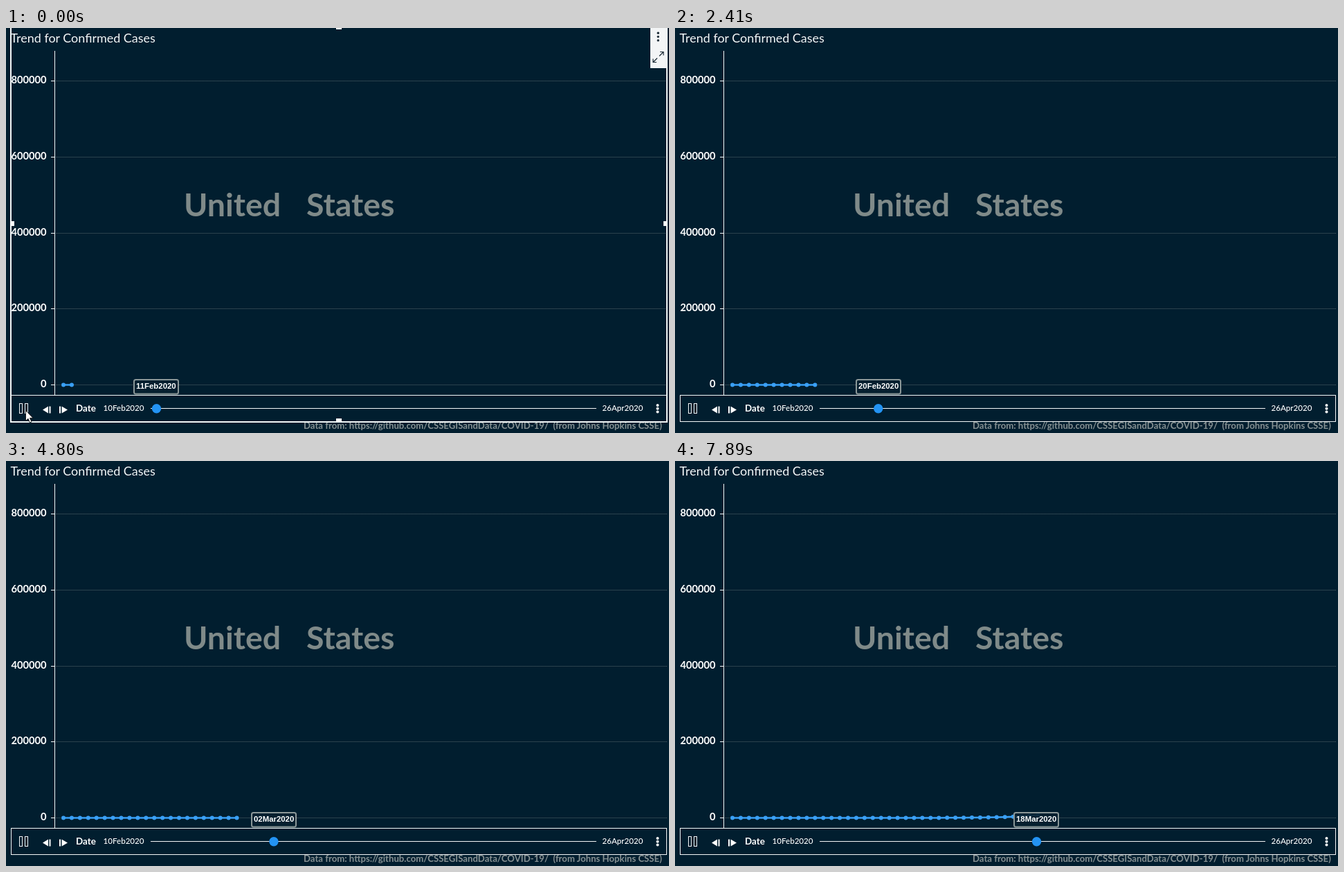
Write an HTML page that moves like this. It is 958 by 585 pixels and loops after 8 s.

```html
<!DOCTYPE html>
<html lang="en">
<head>
<meta charset="utf-8">
<title>Trend for Confirmed Cases</title>
<style>
  html, body { margin: 0; width: 100%; height: 100%; overflow: hidden; background: #011e2f; }
  svg { display: block; width: 958px; height: 585px; font-family: Lato, "Open Sans", sans-serif; fill: #fff; }
  .crisp { shape-rendering: crispEdges; }
  .line { fill: none; stroke: #f4f6f7; stroke-width: 1; }
  .grid { fill: none; stroke: #56646a; stroke-dasharray: 1 1; }
  .title { font-size: 17.95px; fill: #f4f6f7; }
  .place { font-size: 46.5px; font-weight: 700; fill: #7f8a89; }
  .axis { font-size: 14.7px; font-weight: 700; text-anchor: end; }
  .name { font-size: 13.4px; font-weight: 700; }
  .date { font-size: 11.6px; font-weight: 500; }
  .note { font-size: 13.18px; font-weight: 700; fill: #879193; }
  .tip { font: 700 11.4px "Liberation Sans", Arial, sans-serif; }
  .series { fill: none; stroke: #3aa0f6; stroke-width: 2.5; }
  #dots { fill: #3aa0f6; }
  #thumb { fill: #2393f3; }
</style>
</head>
<body>
<svg viewBox="0 0 958 585">
  <rect width="958" height="585" fill="#011e2f"/>
  <text class="title" x="6.5" y="21">Trend for Confirmed Cases</text>
  <g id="scale"></g>
  <path class="line crisp" d="M70.5 33V530"/>
  <text class="place" x="257" y="272">United</text>
  <text class="place" x="434" y="272">States</text>
  <text class="note" x="430" y="579">Data from: https://github.com/CSSEGISandData/COVID-19/&#160; (from Johns Hopkins CSSE)</text>

  <path id="trend" class="series"/>
  <g id="dots"></g>

  <rect class="line crisp" x="7.5" y="530.5" width="947" height="38"/>
  <path class="line crisp" d="M19.5 542.5h4v14h-4zM27.5 542.5h4v14h-4z"/>
  <path d="M53 551.5l8-5v10zM62.5 546.5h2v10h-2zM77 546.5h2v10h-2zM80.5 546.5v10l8.5-5z"/>
  <text class="name" x="101" y="554">Date</text>
  <text class="date" x="140.5" y="553">10Feb2020</text>
  <text class="date" x="861.5" y="553">26Apr2020</text>
  <path class="line crisp" d="M209 549.5H853"/>
  <circle cx="941.5" cy="545" r="2"/>
  <circle cx="941.5" cy="549.7" r="2"/>
  <circle cx="941.5" cy="554.4" r="2"/>
  <circle id="thumb" cy="549.7" r="6.7"/>

  <g id="tip">
    <rect id="tipBox" x="-32" y="508" height="20.5" rx="2.5" fill="#06202f" fill-opacity=".92" stroke="#8b9798" stroke-width="2"/>
    <text id="tipText" class="tip" x="-29" y="521"></text>
  </g>

  <g id="menu">
    <rect x="931" width="24" height="58" fill="#f3f5f6"/>
    <g fill="#1c2b36">
      <circle cx="942.3" cy="7.3" r="1.7"/>
      <circle cx="942.3" cy="12.6" r="1.7"/>
      <circle cx="942.3" cy="17.9" r="1.7"/>
    </g>
    <path d="M945 34.5h5v5M950 34.5l-6 6M940 49.5h-5v-5M935 49.5l6-6" fill="none" stroke="#1c2b36" stroke-width="1.2"/>
  </g>

  <g id="frame" class="crisp">
    <path class="line" d="M7 0V569H955V0" style="stroke-width:2"/>
    <path d="M477 0h8v2h-8zM477 564h8v5h-8zM6 279h6v7h-6zM950 279h5v7h-5z"/>
  </g>

  <path id="cursor" d="M.5 .5V15.5L4 12.3L6.5 18L9 16.9L6.5 11.4H11z" stroke="#000" stroke-width=".8"/>
</svg>
<script>
const LOOP = 8000;
const MONTHS = ["Jan", "Feb", "Mar", "Apr"];
const $ = id => document.getElementById(id);

// [start in ms, days since 10 Feb]
const days = [
  [0, 1], [700, 2], [1030, 4], [1380, 5], [1710, 6], [2060, 8], [2410, 10],
  [2740, 11], [3090, 13], [3440, 15], [3770, 16], [4120, 18], [4450, 20],
  [4800, 21], [5150, 23], [5480, 25], [5830, 27], [6180, 28], [6510, 30],
  [6860, 32], [7190, 33], [7540, 35], [7890, 37]
];
// [start in ms, pointer tip]
const pointer = [[0, [28, 552]], [350, [535.5, 563]], [700, [500, 5]], [1380, null]];

const at = (list, t) => list.filter(step => step[0] <= t).pop()[1];
const show = (id, on) => $(id).setAttribute("visibility", on ? "visible" : "hidden");
const move = (id, x, y) => $(id).setAttribute("transform", `translate(${x} ${y})`);

const pointX = d => 83 + 11.93 * d;
const cases = d => 7800 * Math.exp(0.3 * (d - 37));
const pointY = d => 515.5 - cases(d) * 0.000549;
const slideX = d => 209 + 644 / 76 * d;

function dateText(d) {
  const date = new Date(Date.UTC(2020, 1, 10 + d));
  return String(date.getUTCDate()).padStart(2, "0") + MONTHS[date.getUTCMonth()] + date.getUTCFullYear();
}

$("scale").innerHTML = [0, 1, 2, 3, 4].map(i => {
  const y = Math.round(515.2 - 109.75 * i) + 0.5;
  return `<path class="grid crisp" d="M70 ${y}H955"/><path class="line crisp" d="M65 ${y}H70"/>
    <text class="axis" x="58.5" y="${y + 3.5}">${i * 200000}</text>`;
}).join("");

let shown = -1;
function drawDay(last) {
  if (last === shown) return;
  shown = last;
  const points = Array.from({ length: last + 1 }, (_, d) => [pointX(d), pointY(d)]);
  $("trend").setAttribute("d", "M" + points.join("L"));
  $("dots").innerHTML = points.map(([x, y]) => `<circle cx="${x}" cy="${y}" r="3"/>`).join("");
  $("thumb").setAttribute("cx", slideX(last));
  $("tipText").textContent = dateText(last);
  $("tipBox").setAttribute("width", Math.round($("tipText").getComputedTextLength()) + 6);
  move("tip", Math.round(slideX(last) - 0.2), 0);
}

function draw(t) {
  drawDay(at(days, t));
  show("frame", t < 1380);
  show("menu", t < 1710);
  const tip = at(pointer, t);
  show("cursor", tip);
  if (tip) move("cursor", ...tip);
}

const start = performance.now();
function tick() {
  draw((performance.now() - start) % LOOP);
  requestAnimationFrame(tick);
}
tick();
</script>
</body>
</html>
```
